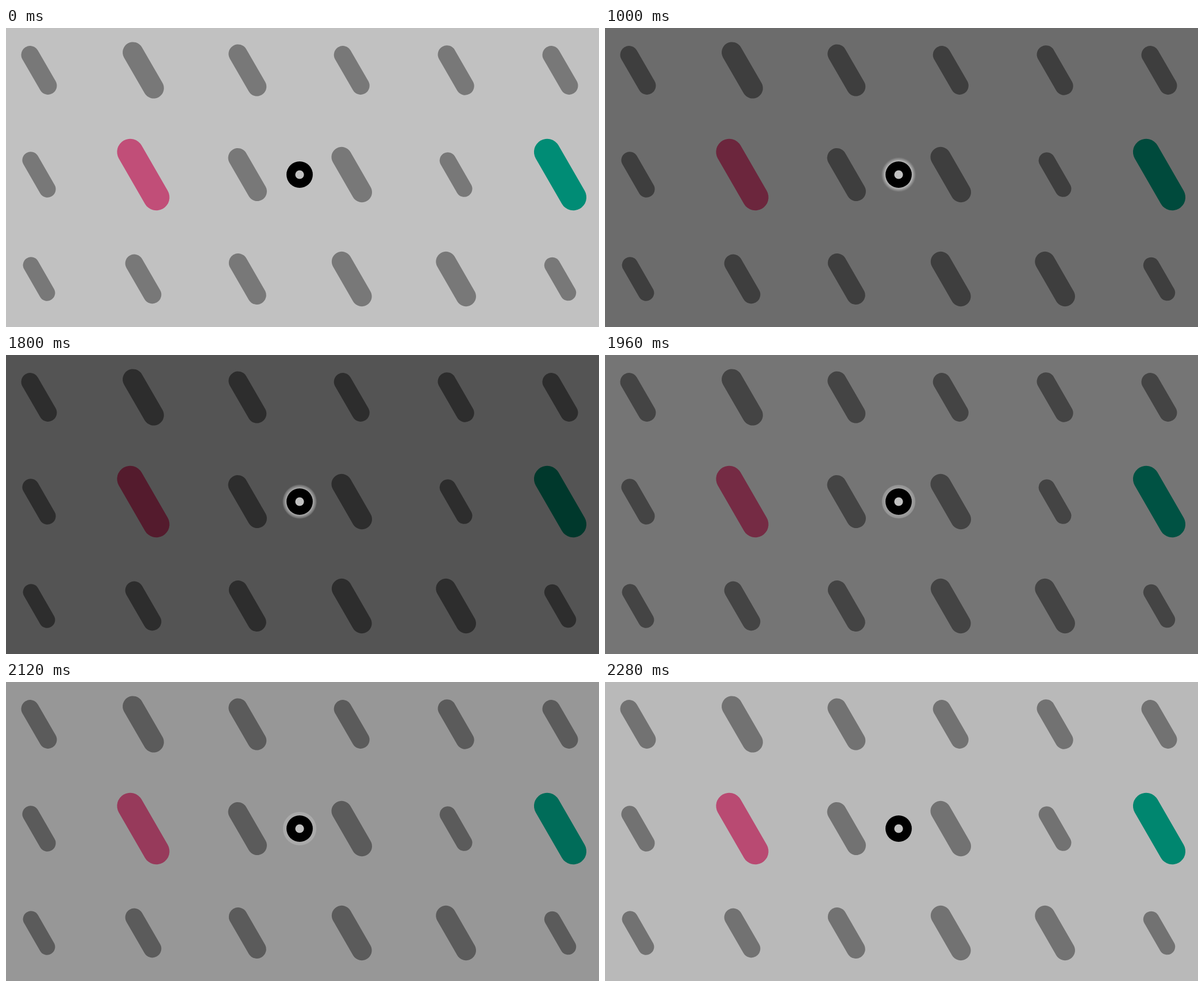
Recreate the animation shown at these times as an HTML page with a canvas. Size 1032 by 520 pixels, loop 2.32 s.

```html
<!DOCTYPE html>
<html lang="en">
<head>
<meta charset="utf-8">
<title>Dimming bars</title>
<style>
  html, body { margin: 0; width: 100%; height: 100%; overflow: hidden; background: #c1c1c1; }
  canvas { display: block; }
</style>
</head>
<body>
<canvas id="stage" width="1032" height="520"></canvas>
<script>
const ctx = document.getElementById('stage').getContext('2d');
const LOOP = 2320, FADE = 600;
const CENTER = { x: 511, y: 255 };

// Each colour is a pair: fully lit, fully dimmed.
const BACKGROUND = [[193, 193, 193], [67, 67, 67]];
const GREY = [[120, 120, 120], [34, 34, 34]];
const PINK = [[193, 78, 120], [67, 19, 33]];
const TEAL = [[0, 140, 117], [0, 43, 33]];

const BAR_WIDTHS = [
  [31, 35.9, 33, 31, 31.6, 31],
  [29.1, 45.6, 33.7, 35.3, 28.4, 45.6],
  [27.9, 31.4, 32.5, 34.9, 34.9, 27.7]
];

const clamp = v => Math.min(1, Math.max(0, v));
const lerp = (a, b, k) => a + (b - a) * k;
const shade = ([lit, dim], k) =>
  `rgb(${lit.map((v, i) => Math.round(lerp(v, dim[i], k))).join()})`;
const light = alpha => `rgba(193,193,193,${alpha})`;

function dimming(t) {
  if (t < 640) return 0;
  if (t < 1800) {
    const step = t < 1040 ? 80 : 40;
    return clamp((Math.floor(t / step) * step - 554) / FADE);
  }
  const held = 1800 + Math.floor((t - 1800) / 80) * 80;
  return clamp((LOOP - held) / FADE);
}

function disc(radius, fill) {
  ctx.fillStyle = fill;
  ctx.beginPath();
  ctx.arc(CENTER.x, CENTER.y, radius, 0, Math.PI * 2);
  ctx.fill();
}

function drawBar(column, row, width, color) {
  const x = 57.5 + column * 181.4, y = 73.5 + row * 181.5;
  const dx = width * Math.cos(Math.PI / 3), dy = width * Math.sin(Math.PI / 3);
  ctx.strokeStyle = color;
  ctx.lineWidth = width;
  ctx.beginPath();
  ctx.moveTo(x - dx, y - dy);
  ctx.lineTo(x + dx, y + dy);
  ctx.stroke();
}

// The halo falls off softly while dimmed and flattens as the light returns.
function drawHalo(flatness) {
  const inner = 22, outer = 30.5;
  const glow = ctx.createRadialGradient(CENTER.x, CENTER.y, inner, CENTER.x, CENTER.y, outer);
  glow.addColorStop(0, light(lerp(1, 0.47, flatness)));
  glow.addColorStop(0.4, light(lerp(0.62, 0.47, flatness)));
  glow.addColorStop(0.75, light(lerp(0.22, 0.45, flatness)));
  glow.addColorStop(lerp(0.98, 0.88, flatness), light(0));
  disc(outer, glow);
}

function draw(t) {
  const dim = dimming(t);
  ctx.fillStyle = shade(BACKGROUND, dim);
  ctx.fillRect(0, 0, 1032, 520);

  ctx.lineCap = 'round';
  BAR_WIDTHS.forEach((widths, row) => widths.forEach((width, column) => {
    const color = row !== 1 ? GREY : column === 1 ? PINK : column === 5 ? TEAL : GREY;
    drawBar(column, row, width, shade(color, dim));
  }));

  if (dim > 0.1) drawHalo(t < 1800 ? 0 : clamp((1 - dim) * 2));
  disc(22.9, '#000');
  disc(7.6, light(1));
}

function tick() {
  draw(performance.now() % LOOP);
  requestAnimationFrame(tick);
}
tick();
</script>
</body>
</html>
```
